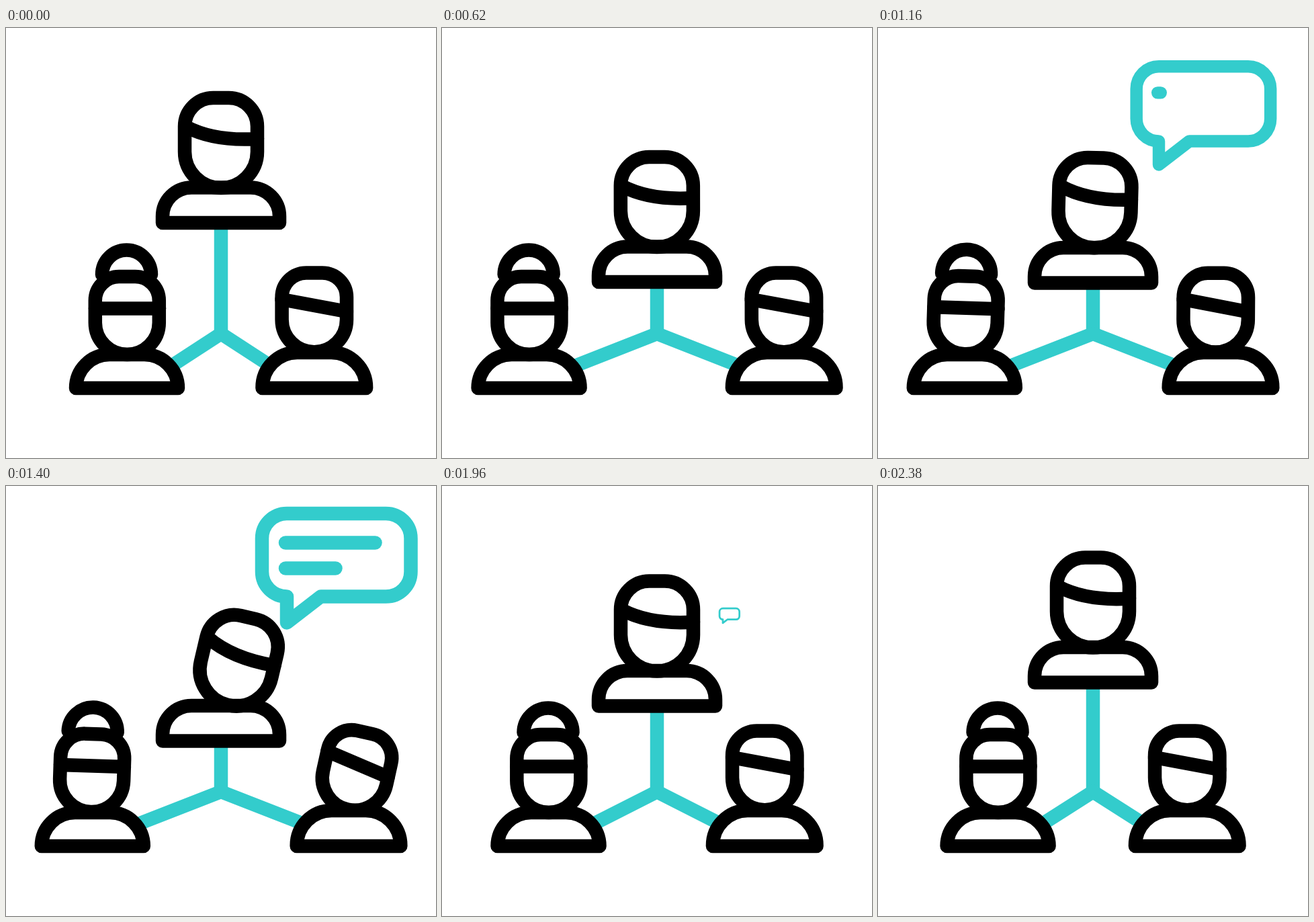
Write an HTML page with a canvas that moves like this. It is 640 px wide and 640 px high and loops after 2400 ms.

```html
<!DOCTYPE html>
<html lang="en">
<head>
<meta charset="utf-8">
<title>Team discussion</title>
<style>
  html, body { margin: 0; width: 100%; height: 100%; overflow: hidden; background: #fff; }
  canvas { display: block; width: 640px; height: 640px; }
</style>
</head>
<body>
<canvas id="stage" width="640" height="640"></canvas>
<script>
const ctx = document.getElementById('stage').getContext('2d');
const LOOP = 2400, BLACK = '#000', TEAL = '#33cccc';
const DROP = 89.5, SPREAD = 51.2;
const NOD = [600, 960, 1400, 1780];

const clamp = v => Math.min(1, Math.max(0, v));
const span = (t, a, b) => clamp((t - a) / (b - a));
const smooth = u => u * u * (3 - 2 * u);
const mix = (a, b, u) => a + (b - a) * u;

// Timing curve with handles (x1, 0) and (x2, 1)
function ease(x, x1, x2) {
  let lo = 0, hi = 1;
  for (let i = 0; i < 24; i++) {
    const s = (lo + hi) / 2, r = 1 - s;
    if (3 * x1 * s * r * r + 3 * x2 * s * s * r + s * s * s < x) lo = s; else hi = s;
  }
  return smooth(lo);
}

// 0 = gathered, 1 = spread out
function spreadAt(t) {
  if (t < 1840) return ease(span(t, 220, 720), 0.33, 0.02);
  return 1 / (1 + Math.pow((t - 1840) / 104, 2.15));
}

// Blend rest -> first pose -> second pose -> rest; a pose is [dx, dy, degrees]
function poseAt(t, first, second) {
  const keys = [[0, 0, 0], first, second, [0, 0, 0]];
  let i = 0;
  while (i < 2 && t > NOD[i + 1]) i++;
  const u = smooth(span(t, NOD[i], NOD[i + 1]));
  return keys[i].map((v, k) => mix(v, keys[i + 1][k], u));
}

function stroke(path, color = BLACK) {
  ctx.strokeStyle = color;
  ctx.stroke(new Path2D(path));
}

function body(cx, half, top, bottom, r) {
  const l = cx - half, e = cx + half;
  const path = `M${l} ${bottom}V${top + r}A${r} ${r} 0 0 1 ${l + r} ${top}` +
    `H${e - r}A${r} ${r} 0 0 1 ${e} ${top + r}V${bottom}Z`;
  ctx.fillStyle = '#fff';
  ctx.fill(new Path2D(path));
  stroke(path);
}

// chin is the centre height of the half circle that closes the head
function head(cx, half, top, r, chin) {
  const l = cx - half, e = cx + half;
  stroke(`M${l} ${top + r}A${r} ${r} 0 0 1 ${l + r} ${top}H${e - r}` +
    `A${r} ${r} 0 0 1 ${e} ${top + r}V${chin}A${half} ${half} 0 0 1 ${l} ${chin}Z`);
}

function person(dx, dy, p, pose) {
  ctx.save();
  ctx.translate(dx, dy);
  body(...p.body);
  const cx = p.head[0], chin = p.head[4];
  ctx.translate(cx + pose[0], chin + pose[1]);
  ctx.rotate(pose[2] * Math.PI / 180);
  ctx.translate(-cx, -chin);
  head(...p.head);
  p.hair.forEach(h => stroke(h));
  ctx.restore();
}

const boss = {
  body: [320, 87, 237.5, 290, 43],
  head: [320, 54, 104, 42.5, 184],
  hair: ['M268 147Q310 169 374 165']
};
const left = {
  body: [180, 76, 486, 536, 50],
  head: [180.3, 47.5, 370, 35.5, 438.5],
  hair: ['M133 417.5H228', 'M143 367A36.5 36.5 0 0 1 216 367']
};
const right = {
  body: [458.8, 77.3, 483, 536, 52],
  head: [458.8, 48.2, 364.5, 36.2, 434],
  hair: ['M410.5 404L507 422']
};

function links(dx, dy) {
  ctx.lineJoin = 'miter';
  ctx.lineCap = 'butt';
  stroke(`M320 ${285 + dy}V455`, TEAL);
  stroke(`M${243 - dx} 505L320 455L${397 + dx} 505`, TEAL);
  ctx.lineJoin = ctx.lineCap = 'round';
}

function textLine(y, length, from, to) {
  if (to > from) stroke(`M${416 + length * from} ${y}H${416 + length * to}`, TEAL);
}

function bubble(t) {
  const size = smooth(span(t, 1000, 1200)) * (1 - smooth(span(t, 1830, 2000)));
  if (size <= 0) return;
  ctx.save();
  ctx.translate(418, 204);
  ctx.scale(size, size);
  ctx.translate(-418, -204);
  stroke('M418 164.5V203.5L468.5 164.5H565.5A37 37 0 0 0 602.5 127.5V78' +
    'A37 37 0 0 0 565.5 41H418A37 37 0 0 0 381 78V127.5A37 37 0 0 0 418 164.5Z', TEAL);
  textLine(84.5, 133.5, smooth(span(t, 1560, 1740)), smooth(span(t, 1140, 1320)));
  textLine(122.5, 74.5, smooth(span(t, 1600, 1780)), smooth(span(t, 1200, 1380)));
  ctx.restore();
}

function draw(t) {
  ctx.fillStyle = '#fff';
  ctx.fillRect(0, 0, 640, 640);
  ctx.lineWidth = 20.5;
  const k = spreadAt(t), dx = SPREAD * k, dy = DROP * k;
  links(dx, dy);
  bubble(t);
  person(-dx, 0, left, poseAt(t, [3, -0.5, 1.7], [-1.5, -1, 1.9]));
  person(dx, 0, right, poseAt(t, [-20, 0, -9], [9, 0.5, 12.5]));
  person(0, dy, boss, poseAt(t, [-13, -0.5, -7.5], [22.5, 0, 13.2]));
}

const start = performance.now();
function tick() {
  draw((performance.now() - start) % LOOP);
  requestAnimationFrame(tick);
}
tick();
</script>
</body>
</html>
```
